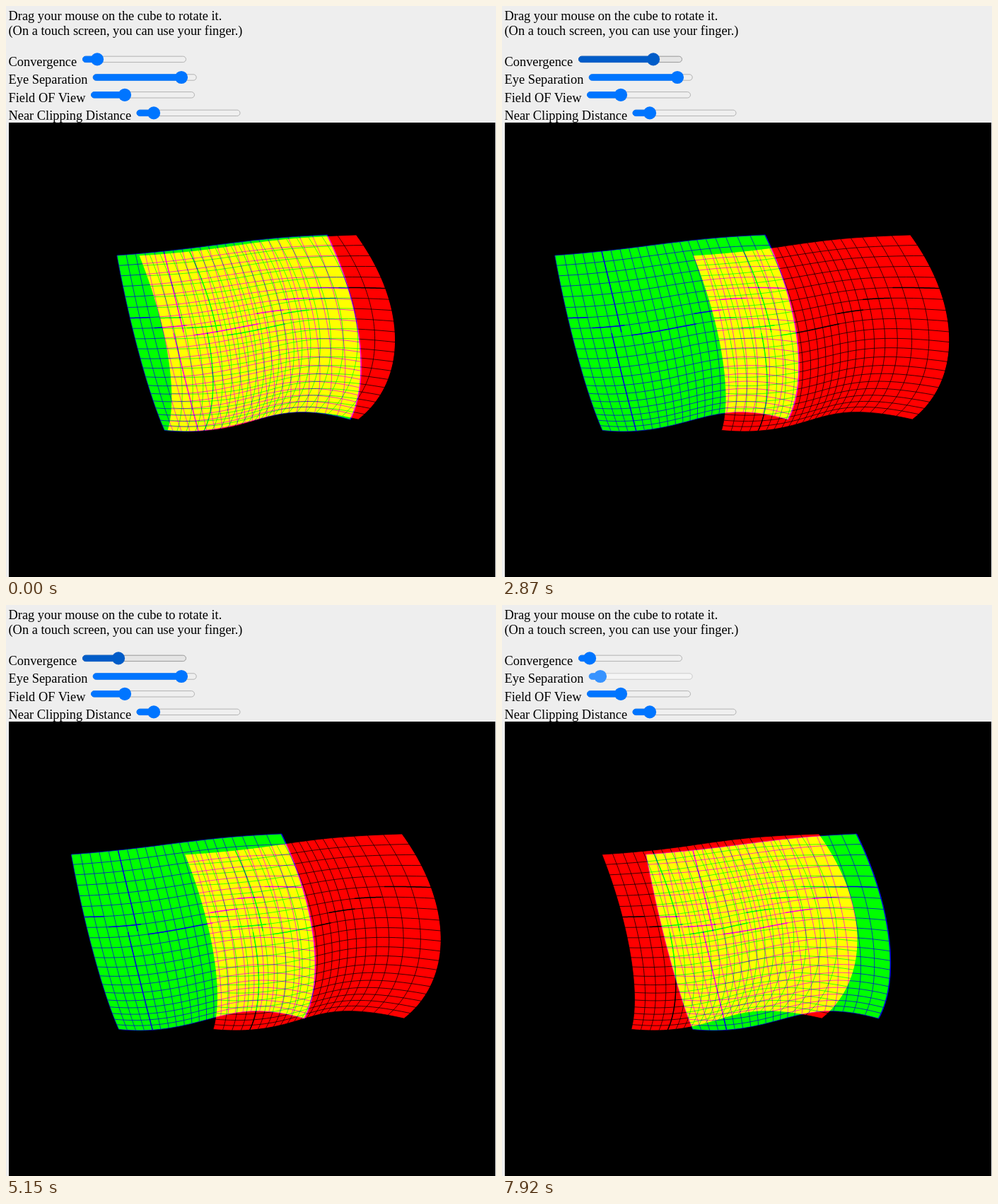
Recreate the animation shown at these times as an HTML page with a canvas. Size 693 by 808 pixels, loop 7990 ms.

```html
<!DOCTYPE html>
<html lang="en">
<head>
<meta charset="utf-8">
<title>Anaglyph surface</title>
<style>
  html, body { margin: 0; width: 100%; height: 100%; overflow: hidden; background: #eee; }
  canvas, svg { position: absolute; left: 0; top: 0; display: block; }
  text { font: 18.4px "Liberation Serif", serif; }
</style>
</head>
<body>
<canvas id="stage" width="693" height="808"></canvas>
<svg width="693" height="808">
  <text x="3.5" y="20.3">Drag your mouse on the cube to rotate it.</text>
  <text x="3.5" y="41.3">(On a touch screen, you can use your finger.)</text>
  <text x="3.5" y="85.2">Convergence</text>
  <text x="3.5" y="110.4">Eye Separation</text>
  <text x="3.5" y="135.6">Field OF View</text>
  <text x="3.5" y="160.8">Near Clipping Distance</text>
</svg>
<script>
const LOOP = 7990, COLS = 22, ROWS = 20;
const VIEW = { x: 4, y: 165, w: 688, h: 643 };
const stage = document.getElementById('stage').getContext('2d');
const layer = document.createElement('canvas').getContext('2d');
layer.canvas.width = 693;
layer.canvas.height = 808;

// The sheet in camera space as [x, y, depth]: a parallelogram plus one wave along each side.
const CORNER = [-156.7, 119.2, .893];
const ALONG_U = [265, 19.5, -.04], ALONG_V = [33, -235, .123];
const WAVE_U = [21, -12.3, -.07], WAVE_V = [21, -12.3, -.093];
const waveU = u => curve([0, .14, -.32, -.74, 0], u);
const waveV = v => 4 * v * (1 - v);

// Quartic through five evenly spaced values.
function curve(values, t) {
  return values.reduce((sum, value, i) => {
    for (let j = 0; j < 5; j++) if (j !== i) value *= (4 * t - j) / (i - j);
    return sum + value;
  }, 0);
}

// Screen position between the eyes, and the distance between both eyes' views.
function project(u, v) {
  const a = waveU(u), b = waveV(v);
  const [x, y, depth] = CORNER.map((c, i) =>
    c + u * ALONG_U[i] + v * ALONG_V[i] + a * WAVE_U[i] + b * WAVE_V[i]);
  return { x: 348 + x / depth, y: 486.5 - y / depth, parallax: 200 / depth };
}

const mix = (a, b, t) => a + (b - a) * t;
const STEPS = 44;
const line = pointAt => Array.from({ length: STEPS + 1 }, (_, i) => pointAt(i / STEPS));
const rowLine = (row, from = 0, to = 1) => line(t => project(mix(from, to, t), row / ROWS));
const colLine = (col, from = 0, to = 1) => line(t => project(col / COLS, mix(from, to, t)));

const rows = Array.from({ length: ROWS + 1 }, (_, i) => rowLine(i));
const cols = Array.from({ length: COLS + 1 }, (_, i) => colLine(i));
const outline = [
  ...rows[0], ...cols[COLS], ...[...rows[ROWS]].reverse(), ...[...cols[0]].reverse()
];
// Grid pieces that look heavier: row, first u, last u.
const heavy = [
  [6, 0, .09], [7, .1, .25], [8, .27, .6], [7, .6, .74], [6, .75, .86], [5, .88, 1]
].map(args => rowLine(...args));
heavy.push(colLine(5, 0, .38), colLine(4, .38, 1));

function drawEye(side, fill, ink, picConv, picSep) {
  const eye = (picSep - 123.5) / 124.5;
  const converge = 2834 / (picConv - 114.3);
  const trace = points => points.forEach(({ x, y, parallax }) =>
    layer.lineTo(x + side * eye * (parallax - converge) / 2, y));
  const stroke = (lines, width) => {
    layer.lineWidth = width;
    for (const points of lines) {
      layer.beginPath();
      trace(points);
      layer.stroke();
    }
  };
  layer.clearRect(0, 0, 693, 808);
  layer.fillStyle = fill;
  layer.strokeStyle = ink;
  layer.beginPath();
  trace(outline);
  layer.fill();
  layer.globalAlpha = .75;
  stroke(rows, 1);
  stroke(cols, 1);
  layer.globalAlpha = .9;
  stroke([...heavy, cols[COLS]], 1.5);
  layer.globalAlpha = 1;
  stage.drawImage(layer.canvas, 0, 0);
}

const [NORMAL, HOVER, ACTIVE] = [
  { accent: '#0075ff', track: '#efefef', border: '#b2b2b2' },
  { accent: '#005cc8', track: '#e5e5e5', border: '#999' },
  { accent: '#3793ff', track: '#f5f5f5', border: '#cbcbcb' }
];

function drawSlider(left, y, thumb, look) {
  const bar = width => {
    stage.beginPath();
    stage.roundRect(left + .5, y - 4.2, width, 8.4, 4.2);
  };
  bar(146);
  stage.fillStyle = look.track;
  stage.fill();
  stage.strokeStyle = look.border;
  stage.lineWidth = 1;
  stage.stroke();
  stage.fillStyle = stage.strokeStyle = look.accent;
  bar(thumb - left);
  stage.fill();
  stage.stroke();
  stage.beginPath();
  stage.arc(thumb, y, 9.1, 0, 7);
  stage.fill();
}

const start = {
  conv: 129, sep: 248, picConv: 129, picSep: 248,
  convLook: NORMAL, sepLook: NORMAL, fovLook: NORMAL, nearLook: NORMAL
};

// A click moves the thumb at once; the picture follows, then the button is released.
const click = (name, pic, x, press, redraw, release) => [
  [press, { [name]: x, [name + 'Look']: ACTIVE }],
  [redraw, { [pic]: x }],
  [release, { [name + 'Look']: HOVER }]
];
const drag = (name, pic, from, to, begin, count) =>
  Array.from({ length: count }, (_, i) => {
    const x = mix(from, to, (i + 1) / count);
    return [begin + i * 70, { [name]: x, [pic]: x, [name + 'Look']: ACTIVE }];
  });

const events = [
  [1250, { nearLook: HOVER }],
  [1380, { nearLook: NORMAL, fovLook: HOVER }],
  [1450, { fovLook: NORMAL, sepLook: HOVER }],
  [1580, { sepLook: NORMAL, convLook: HOVER }],
  ...click('conv', 'picConv', 182, 1910, 2050, 2190),
  ...click('conv', 'picConv', 214, 2650, 2720, 2870),
  ...click('conv', 'picConv', 246, 3200, 3340, 3550),
  ...click('conv', 'picConv', 117, 4020, 4220, 4550),
  ...click('conv', 'picConv', 159, 4940, 5010, 5150),
  [5350, { convLook: ACTIVE }],
  ...drag('conv', 'picConv', 159, 124, 5550, 8),
  [6110, { convLook: HOVER }],
  [6220, { convLook: NORMAL, sepLook: HOVER }],
  ...click('sep', 'picSep', 172, 6420, 6490, 6630),
  [6830, { sepLook: ACTIVE }],
  ...drag('sep', 'picSep', 172, 237, 7030, 7),
  [7780, { sepLook: HOVER }],
  [7920, { sep: 139, sepLook: ACTIVE }]
];

function draw(time) {
  const state = { ...start };
  for (const [at, change] of events) if (at <= time) Object.assign(state, change);

  stage.fillStyle = '#eee';
  stage.fillRect(0, 0, 693, 808);
  drawSlider(108, 75.4, state.conv, state.convLook);
  drawSlider(122.7, 101, state.sep, state.sepLook);
  drawSlider(120, 125.8, 168, state.fovLook);
  drawSlider(184.5, 151.4, 209, state.nearLook);

  stage.save();
  stage.beginPath();
  stage.rect(VIEW.x, VIEW.y, VIEW.w, VIEW.h);
  stage.clip();
  stage.fillStyle = '#000';
  stage.fillRect(VIEW.x, VIEW.y, VIEW.w, VIEW.h);
  stage.globalCompositeOperation = 'lighter';
  drawEye(1, '#f00', '#000', state.picConv, state.picSep);
  drawEye(-1, '#0f0', '#00d', state.picConv, state.picSep);
  stage.restore();
}

const begin = performance.now();
function tick() {
  draw((performance.now() - begin) % LOOP);
  requestAnimationFrame(tick);
}
tick();
</script>
</body>
</html>
```
